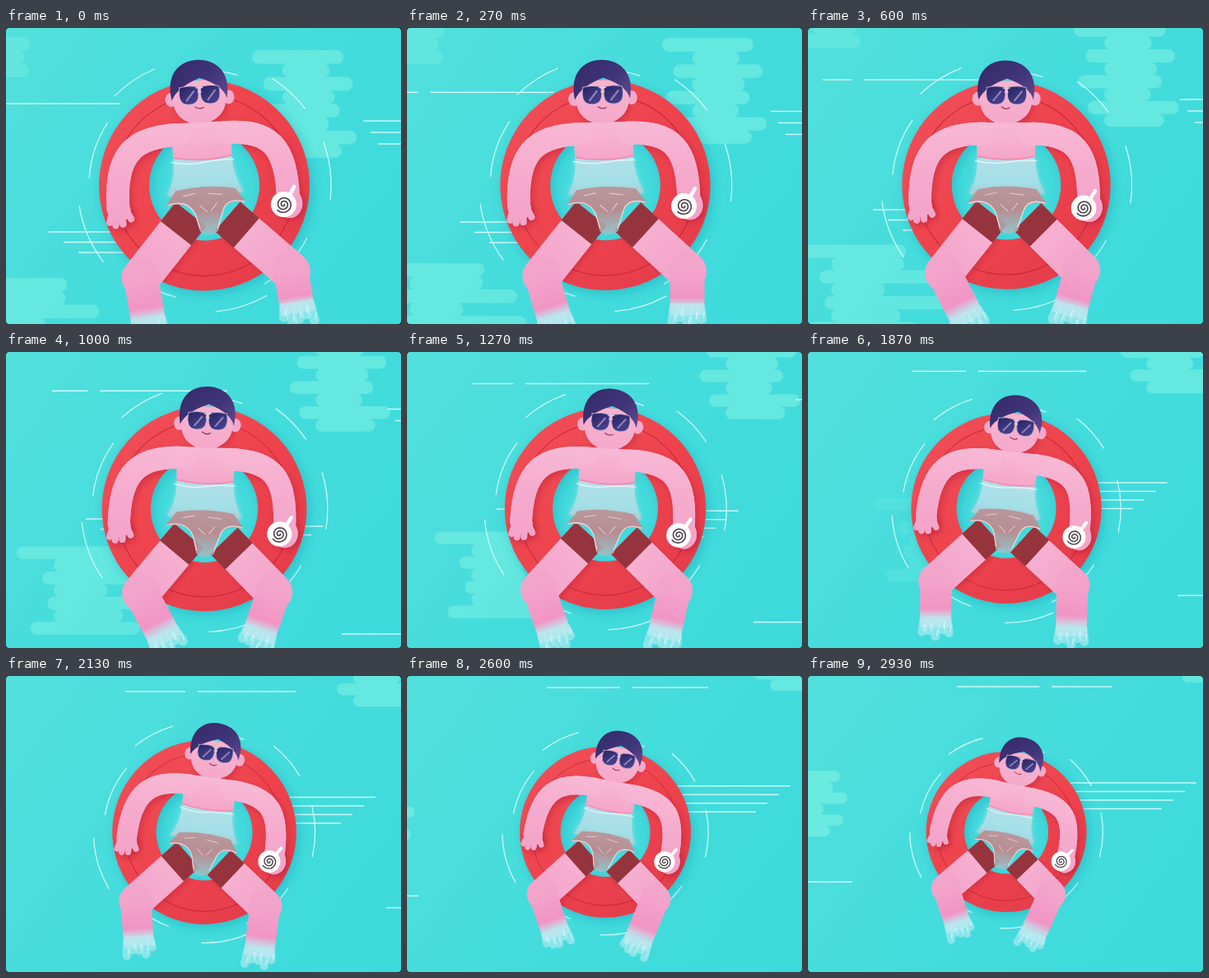
An HTML page with a canvas for the animation above (2990 ms loop, 480 by 360 pixels).

```html
<!DOCTYPE html>
<html lang="en">
<head>
<meta charset="utf-8">
<title>Floating in the pool</title>
<style>
html, body { margin: 0; width: 100%; height: 100%; overflow: hidden; background: #1d2b2e; }
canvas { display: block; border-radius: 4px; }
</style>
</head>
<body>
<canvas id="stage" width="480" height="360"></canvas>
<script>
const c = document.getElementById('stage').getContext('2d');
const LOOP = 2990, STEP = 1000 / 15, LAST = 44, RAD = Math.PI / 180;
let n = 0, p = 0; // step number and its share of the loop

// Falls from 1 to 0 over the loop, slowing towards the end
const settle = power => (1 - p) ** power;
const noise = i => { const v = Math.sin(i * 12.9898) * 43758.5453; return v - Math.floor(v); };
const mix = (a, b, t) => [a[0] + (b[0] - a[0]) * t, a[1] + (b[1] - a[1]) * t];
const seg = (a, b) => `M${a}L${b}`;

function ramp(x0, y0, x1, y1, ...stops) {
  const g = c.createLinearGradient(x0, y0, x1, y1);
  stops.forEach(([at, color]) => g.addColorStop(at, color));
  return g;
}

function fill(d, style) {
  c.fillStyle = style;
  c.fill(new Path2D(d));
}

function stroke(d, style, width, cap = 'round') {
  c.strokeStyle = style;
  c.lineWidth = width;
  c.lineCap = cap;
  c.stroke(new Path2D(d));
}

function oval(x, y, rx, ry, style) {
  c.fillStyle = style;
  c.beginPath();
  c.ellipse(x, y, rx, ry, 0, 0, 7);
  c.fill();
}

// Water surface

// Stacked pills: wide rows joined by narrow ones
function patch(x, y, rows, wide, seed, alpha = .34) {
  const pitch = 16.3 - 3 * p;
  c.fillStyle = `rgba(165,255,232,${alpha})`;
  c.beginPath();
  for (let i = 0; i < rows; i++) {
    const r = noise(seed + i), narrow = i % 2;
    const left = x + (narrow ? wide * .3 : wide * .25 * r * (i > 0));
    c.roundRect(left, y + i * pitch, wide * (narrow ? .4 + .2 * r : .8 + .2 * r), pitch + .3, pitch / 2);
  }
  c.fill();
}

function line(left, right, y) {
  c.fillStyle = 'rgba(235,255,253,.85)';
  if (right > left) c.fillRect(left, y - .7, right - left, 1.4);
}

function streak(x, y, length, vx, vy) {
  line(x + vx * n, x + vx * n + length, y + vy * n);
}

function water() {
  c.fillStyle = ramp(0, 0, 480, 360, [0, '#52e0dc'], [.5, '#44dcdc'], [1, '#3ddadc']);
  c.fillRect(0, 0, 480, 360);

  patch(299 + 119 * p, 27 - 126 * (1 - settle(1.3)), 8, 122, 3);
  patch(-62 + 5 * n, 304 - 4.5 * n, 7, 150, 9, .3 * Math.min(1, Math.max(0, (31 - n) / 8)));
  patch(-400 + 7.7 * n, 256 - 3.2 * n, 6, 110, 21);
  patch(-60 + 4 * n, 11 - 3.8 * n, 3, 100, 5, .2);

  // Long broken line sliding up to the top edge
  const y = 13 + 79 * settle(2), gap = 281 - 300 * settle(1.2);
  line(181 - 225 * settle(1.4), gap, y);
  line(gap + 15, 369 - 231 * settle(2), y);

  // Lines passing behind the ring and out on its right
  const x = 472 - 162 * settle(1.5), top = 130 + 170 * settle(1.75);
  for (let i = 0; i < 4; i++) line(315, x - 14 * i, top + 10.5 * i);

  for (let i = 0; i < 3; i++) {
    streak(434 + 9 * i, 113 + 14 * i, 50 - 7 * i, 2, -2.9);
    streak(52 + 18 * i, 248 + 12.5 * i, 95 - 20 * i, 3, -3);
  }
  streak(360, 397, 100, 3.2, -3.6);
  streak(-398, 400, 100, 8, -3.4);
}

// Rubber ring and ripples

function ripples(x, y, r) {
  c.strokeStyle = 'rgba(235,255,253,.8)';
  c.lineWidth = 1.3;
  c.lineCap = 'round';
  for (let i = 0; i < 9; i++) {
    const from = (i * 40 - 20 + 8 * noise(i) + n * .2) * RAD;
    c.beginPath();
    c.arc(x, y, r * (i % 2 ? .91 : 1), from, from + (18 + 14 * noise(i + 40)) * RAD);
    c.stroke();
  }
}

const ring = new Path2D();
ring.arc(0, 0, 128, 0, 7);
ring.closePath();
ring.moveTo(67, 0);
ring.arc(0, 0, 67, 0, 7);

function drawRing() {
  oval(0, 0, 100, 100, '#43dadc');
  c.save();
  c.shadowColor = 'rgba(10,150,175,.4)';
  c.shadowBlur = 14;
  c.shadowOffsetX = 3;
  c.shadowOffsetY = 4;
  c.fillStyle = ramp(-90, -90, 90, 90, [0, '#f04c55'], [.5, '#ee434d'], [1, '#e63d4b']);
  c.fill(ring, 'evenodd');
  c.restore();
  c.strokeStyle = 'rgba(185,28,48,.7)';
  c.lineWidth = 1.1;
  c.beginPath();
  c.arc(0, 0, 110, 0, 7);
  c.stroke();
}

// Swimmer, drawn around the middle of the ring

function arms() {
  const skin = ramp(0, -77, 0, 45, [0, '#f8b9d5'], [.5, '#f5abcd'], [1, '#f3a3c8']);
  stroke('M-106 22C-107-42-84-64-28-63', skin, 28);
  stroke('M101 22C102-42 84-64 28-63', skin, 28);
  oval(-105, 26, 14, 13, skin);
  stroke('M-114 28L-117 39M-108 30L-110 43M-101 30L-101 42M-96 26L-91 36', skin, 8);
  oval(102, 27, 16, 18, skin);
}

function leg({ hip, knee, ankle }) {
  const len = Math.hypot(ankle[0] - knee[0], ankle[1] - knee[1]);
  const tip = mix(knee, ankle, 1 + 14 / len);
  stroke(seg(hip, knee), ramp(...hip, ...knee, [0, '#f7b5d2'], [1, '#f3a4cb']), 47, 'butt');
  oval(...knee, 23.5, 23.5, '#f3a4cb');
  stroke(seg(knee, tip), ramp(...knee, ...tip, [0, '#f3a4cb'], [.6, '#f195c4'],
    [.76, 'rgba(210,208,228,.95)'], [1, 'rgba(180,232,240,.75)']), 42, 'butt');
  c.save();
}

function foam({ knee, ankle }) {
  c.save();
  c.translate(...ankle);
  c.rotate(Math.atan2(ankle[1] - knee[1], ankle[0] - knee[0]));
  for (let i = -2; i < 3; i++) {
    const reach = 21 + 5 * Math.sin(i * 2.3 + n * .5);
    stroke(`M5 ${i * 8}L${reach} ${i * 9}`, 'rgba(185,235,242,.6)', 12);
    stroke(`M${reach - 9} ${i * 9 - 3}l8 1`, 'rgba(245,255,255,.7)', 1.1);
  }
  c.restore();
}

function torso() {
  c.save();
  c.shadowColor = 'rgba(165,224,232,.9)';
  c.shadowBlur = 6;
  fill('M-36-34Q-34-10-46 10Q0 20 47 10Q36-10 35-34Z',
    ramp(0, -34, 0, 14, [0, '#b2e0e9'], [.65, '#a3dfe7'], [1, '#a9cbd2']));
  c.restore();
  fill('M-37-77L-36-35Q0-28 35-35L37-77Z', ramp(0, -77, 0, -32, [0, '#f8b9d5'], [1, '#f5a6c8']));
  stroke('M-35-35Q0-28 34-35', '#f58db2', 2);
  stroke('M-38-30Q-18-25 0-28T37-30', 'rgba(245,255,255,.8)', 1.3);
}

function shorts() {
  fill('M-35 5Q0-2 37 5L50 23Q28 17 21 32L14 56Q2 64-8 56L-13 34Q-22 17-48 23Z',
    ramp(0, 0, 0, 60, [0, 'rgba(184,150,155,.96)'], [.5, 'rgba(188,138,143,.96)'], [1, 'rgba(166,190,196,.8)']));
  stroke('M-46 22Q-22 15-13 34L-8 52M48 22Q26 16 21 32L14 52', 'rgba(250,240,242,.75)', 1.4);
  stroke('M-26 12l14-3M5 10l16 2M-7 24l9 8M14 22l-7 9', 'rgba(250,240,242,.6)', 1.1);
}

function head() {
  const skin = ramp(0, -130, 0, -75, [0, '#f8b4cf'], [1, '#f5a9ca']);
  oval(-35, -106, 7, 8.5, '#f4a8ca');
  oval(35, -106, 7, 8.5, '#f4a8ca');
  fill('M-33-128V-108C-33-86-20-76-1-76S32-86 32-108V-128Z', skin);
  fill('M-34-105C-40-136-24-153-1-153S40-136 33-105Q29-121 1-131Q-27-121-34-105Z',
    ramp(-20, -150, 25, -105, [0, '#372c6c'], [.6, '#41357a'], [1, '#5a468c']));
  for (const x of [-13, 13]) {
    const lens = `M${x - 11}-120Q${x}-123 ${x + 11}-120Q${x + 15}-99 ${x}-99Q${x - 15}-99 ${x - 11}-120Z`;
    fill(lens, ramp(x - 8, -121, x + 8, -99, [0, '#2b2666'], [1, '#4c4390']));
    stroke(lens, '#d3c6e2', .8);
    stroke(`M${x - 3}-104l9-11`, '#8f83bb', 2.2);
  }
  stroke('M-4-119H4M-2-114Q0-116 2-114', '#e0d2e6', 1.2);
  stroke('M-6-96Q-1-92 4-95', '#8c3964', 1.3);
}

function cup() {
  stroke('M103 17L109 7', '#fff', 4.5);
  oval(95, 28, 15.5, 15.5, '#fff');
  c.beginPath();
  for (let a = 0; a < 15; a += .2) {
    const r = 1 + a * .62;
    c.lineTo(95 + r * Math.cos(a), 28 + r * Math.sin(a));
  }
  c.strokeStyle = '#4a3e45';
  c.lineWidth = 1.6;
  c.stroke();
}

function draw() {
  c.setTransform(1, 0, 0, 1, 0, 0);
  water();
  const x = 241, y = 191.5 - 2 * p, size = 1 - .238 * p * p;
  ripples(x, y, 154 * size);

  // Both feet swing inwards and back together
  const kick = Math.cos((n - 13) / 29 * 2 * Math.PI);
  const legs = [
    { hip: [-18, 34], knee: [-79 + 4 * kick, 108], ankle: [-62 + 16 * kick, 156] },
    { hip: [26, 39], knee: [95 - 5 * kick, 110 - 27 * p], ankle: [90 - 15 * kick, 147] }
  ];

  c.save();
  c.translate(x, y);
  c.rotate((n * .34 - 3) * RAD);
  c.scale(size, size);
  drawRing();

  // Limb shadows fall on the ring only
  c.save();
  c.clip(ring, 'evenodd');
  c.shadowColor = 'rgba(150,8,40,.3)';
  c.shadowBlur = 9;
  c.shadowOffsetX = 3;
  c.shadowOffsetY = 4;
  arms();
  for (const l of legs) stroke(seg(l.hip, l.knee) + 'L' + l.ankle, '#f3a4cb', 42);
  oval(-1, -108, 32, 34, '#f5a9ca');
  c.restore();

  torso();
  arms();
  head();
  for (const l of legs) {
    leg(l);
    c.restore();
    stroke(seg(l.hip, mix(l.hip, l.knee, .3)), '#96343e', 47.5, 'butt');
    foam(l);
  }
  shorts();
  cup();
  c.restore();
}

const start = performance.now();
function tick(now) {
  n = Math.min(LAST, Math.floor((Math.max(0, now - start) % LOOP + 3.4) / STEP));
  p = n / LAST;
  draw();
  requestAnimationFrame(tick);
}
tick(start);
</script>
</body>
</html>
```
